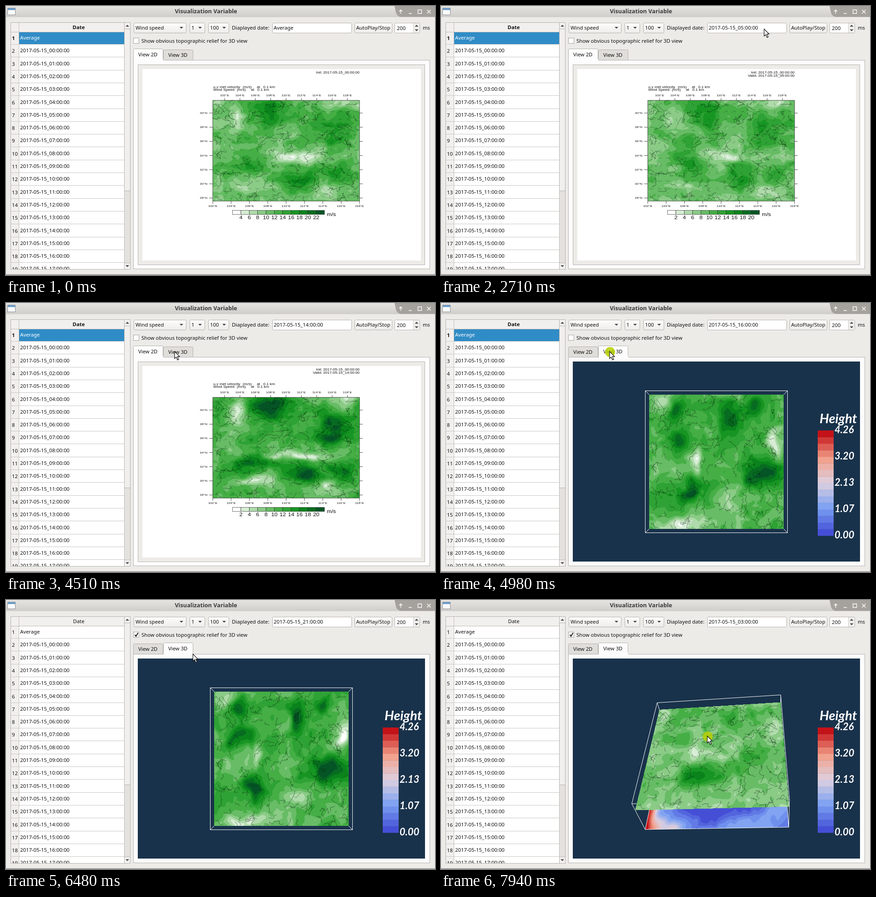
Animation, 944 px wide and 593 px high, one loop 8 s. Source, as an HTML page with a canvas:

```html
<!DOCTYPE html>
<html lang="en">
<head>
<meta charset="utf-8">
<title>Visualization Variable</title>
<style>
html, body { margin: 0; width: 100%; height: 100%; overflow: hidden; background: #edebe8; }
svg, canvas { position: absolute; left: 0; top: 0; width: 944px; height: 593px; }
text { font: 11.3px "Noto Sans", "Open Sans", sans-serif; fill: #111; white-space: pre; }
.bold { font-weight: bold; }
.title { font-size: 12.7px; font-weight: bold; fill: #3b3b3b; }
.fig { font-family: "Liberation Sans", sans-serif; }
.bar { font: italic bold 22px Lato, "Liberation Sans", sans-serif; fill: #fff; }
</style>
</head>
<body>
<svg id="ui" viewBox="0 0 944 593">
  <defs>
    <linearGradient id="titleBg" x2="0" y2="1"><stop stop-color="#e6e4e1"/><stop offset="1" stop-color="#cfcdc9"/></linearGradient>
    <linearGradient id="buttonBg" x2="0" y2="1"><stop stop-color="#fdfdfc"/><stop offset="1" stop-color="#eeecea"/></linearGradient>
    <clipPath id="tableClip"><rect x="11" y="37" width="250" height="543"/></clipPath>
    <clipPath id="sceneClip"><rect x="290" y="129" width="632" height="441"/></clipPath>
  </defs>
</svg>
<canvas id="map" width="944" height="593"></canvas>
<svg viewBox="0 0 944 593">
  <g id="cursor">
    <circle id="press" cx="1" cy="1" r="11" fill="#b5d000" fill-opacity=".85"/>
    <path d="M0 0V15.5L3.6 12.2L6.4 18.6L9 17.4L6.2 11.2H11Z" fill="#fff" stroke="#111" stroke-width="1.2"/>
  </g>
</svg>
<script>
const LOOP = 8000, TICK = 77, TAB_AT = 4840, SCENE_AT = 4980, CHECK_AT = 6320, DRAG_AT = 7400, DRAG_END = 7850;
const el = id => document.getElementById(id);
const lerp = (a, b, k) => a + (b - a) * k;
const clamp = (x, a, b) => Math.min(b, Math.max(a, x));
const range = n => [...Array(n).keys()];

/* Evenly spaced colour stops, resampled to n colours. */
function ramp(stops, n) {
  const rgb = stops.map(s => [1, 3, 5].map(i => parseInt(s.slice(i, i + 2), 16)));
  return range(n).map(i => {
    const x = i / (n - 1) * (stops.length - 1), j = Math.min(Math.floor(x), stops.length - 2);
    return rgb[j].map((c, k) => Math.round(lerp(c, rgb[j + 1][k], x - j)));
  });
}
const GREENS = ramp(['#ffffff', '#9bd296', '#45ae45', '#0b8f1a', '#055426'], 11);
const HEATS = ramp(['#454fd6', '#7aa0f2', '#ddd0e0', '#f2a08a', '#c41218'], 16);

/* ---------- window ---------- */
const EDGE = '#b4b1ad';
const box = (x, y, w, h, fill, stroke = EDGE, more = '') =>
  `<rect x="${x + .5}" y="${y + .5}" width="${w}" height="${h}" fill="${fill}" stroke="${stroke}" ${more}/>`;
const fill = (x, y, w, h, color, more = '') => `<rect x="${x}" y="${y}" width="${w}" height="${h}" fill="${color}" ${more}/>`;
const text = (x, y, s, more = '') => `<text x="${x}" y="${y}" ${more}>${s}</text>`;
const path = (d, color, width = 1, more = '') => `<path d="${d}" fill="none" stroke="${color}" stroke-width="${width}" ${more}/>`;
const arrow = (x, y, dir = 1, r = 4) => `<path d="M${x - r} ${y}h${2 * r}l${-r} ${dir * r}z" fill="#444"/>`;
const two = n => String(n).padStart(2, '0');
const stamp = h => h < 0 ? 'Average' : `2017-05-${15 + Math.floor(h / 24)}_${two(h % 24)}:00:00`;

function titleBar() {
  return fill(0, 0, 944, 25, 'url(#titleBg)') + fill(0, 24, 944, 1, '#dddbd8') +
    box(3, 4, 17, 15, '#fbfbfb', '#8a8f94') + fill(4, 5, 16, 4, '#6d9fce') +
    text(440, 16, 'Visualization Variable', 'class="title" text-anchor="middle"') +
    '<path d="M855 0H944V24H868Q860 22 858 14Z" fill="#a5a19d"/>' +
    path('M868.5 17V9M865 12l3.5-3.5 3.5 3.5M886 16.5h7M906.5 8.5h8v8h-8zM926.5 8.5l8 8m0-8l-8 8', '#fff', 1.4) +
    fill(0, 591, 944, 1, '#c5c2be') + fill(0, 592, 944, 1, '#8f8c88');
}

function table() {
  const pitch = 28.3;
  let s = box(10, 36, 263, 544, '#fff') + fill(11, 37, 249, 20, '#f2f0ee') + fill(11, 57, 17, 523, '#f2f0ee') +
    fill(28, 57, 232, 27, '#308cc6', 'id="selection"');
  s += text(160, 51, 'Date', 'id="head" text-anchor="middle"') + '<g clip-path="url(#tableClip)">';
  for (const i of range(19)) {
    const y = 57 + i * pitch, line = Math.round(y + 27) + .5;
    s += path(`M11 ${line}H260`, '#c9c6c3') + text(13, y + 18, i + 1, i ? '' : 'id="rowNo"') +
      text(31, y + 17, stamp(i - 1), i ? '' : 'id="rowText"');
  }
  s += '</g>' + path('M11 57.5H260M28.5 37V580M260.5 37V580', '#bdbab6');
  return s + fill(261, 37, 12, 543, '#e4e2df') + box(260, 36, 13, 14, '#f4f2f0') + box(260, 50, 13, 357, '#f1efed') +
    box(260, 566, 13, 14, '#f4f2f0') + arrow(267, 45.5, -1) + arrow(267, 571.5);
}

function toolbar() {
  const button = (x, w) => box(x, 37, w, 22, 'url(#buttonBg)', EDGE, 'rx="2"');
  const combo = (x, w, label) => button(x, w) + text(x + 4, 52, label) + arrow(x + w - 10, 46);
  return combo(281, 115, 'Wind speed') + combo(404, 33, '1') + combo(445, 45, '100') +
    text(497, 52, 'Diaplayed date:') + box(586, 37, 174, 22, '#fff', EDGE, 'rx="2"') + text(589, 52, '', 'id="date"') +
    button(767, 82) + text(808, 52, 'AutoPlay/Stop', 'text-anchor="middle"') +
    box(855, 37, 55, 22, '#fff', EDGE, 'rx="2"') + fill(897, 38, 13, 21, '#f1efed') + path('M896.5 38V59', '#cfccc9') +
    arrow(903.5, 45.5, -1) + arrow(903.5, 51.5) + text(860, 53, '200') + text(917, 52, 'ms') +
    box(280, 70, 12, 12, '#fff', '#a5a29e') + path('M283.5 76.5l2.5 3.5 4.5-7.5', '#111', 2, 'id="check"') +
    text(298, 81, 'Show obvious topographic relief for 3D view');
}

function tab(x, label, active) {
  const y = active ? 94 : 96;
  return box(x, y, 65, 119 - y, active ? '#fdfdfd' : '#e0deda', EDGE, 'rx="2"') +
    (active ? fill(x + 1, 117, 65, 5, '#fdfdfd') : fill(x + 1, 118, 64, 1, '#e0deda') + fill(x, 119, 66, 1, EDGE)) +
    text(x + 11, active ? 111 : 112, label);
}

/* The figure is shown wider than it was plotted, lettering included. */
const fig = (x, y, s, size, anchor = 'start', more = '') =>
  `<text class="fig" transform="translate(${x} ${y}) scale(1.25 1)" style="font-size:${size}px" text-anchor="${anchor}" ${more}>${s}</text>`;

function figure() {
  let s = box(290, 129, 631, 441, '#edebe8') + fill(300, 139, 613, 422, '#fff');
  s += fig(778, 149, 'Init: 2017-05-15_00:00:00', 6.7, 'end') + fig(778, 156, '', 6.7, 'end', 'id="valid"');
  const caption = (name, x, y) => fig(456, y, name, 6.9) + fig(x, y, '(m/s)', 6.9) + fig(x + 31, y, 'at', 6.9) + fig(x + 45, y, '0.1 km', 6.9);
  s += caption('u,v met velocity', 521, 181) + caption('Wind Speed', 508, 187);
  let ticks = '';
  for (const i of range(9)) {
    const top = 481 + i * 33.8, low = 455 + i * 40.35, name = `${102 + 2 * i}°E`;
    s += fig(top, 199, name, 5.9, 'middle') + fig(low, 443, name, 5.9, 'middle');
    ticks += `M${top} 203V208M${low} 430V436`;
  }
  for (const i of range(7)) {
    const y = 236 + i * 31.2;
    s += fig(443, y + 2, `${40 - 2 * i}°N`, 5.9, 'end');
    ticks += `M447 ${y}H455M778 ${y}H785`;
  }
  s += path(ticks, '#222', .8);
  GREENS.forEach((c, i) => s += fill(498.5 + i * 18.4, 450.5, 18.4, 9, `rgb(${c})`, 'stroke="#333" stroke-width=".7"'));
  for (const i of range(10)) s += fig(517 + i * 18.4, 470, '', 10, 'middle', `data-level="${2 + 2 * i}"`);
  return s + fig(706, 463, 'm/s', 10);
}

function scene() {
  let s = fill(290, 129, 632, 441, '#19324b') + '<g clip-path="url(#sceneClip)">';
  HEATS.forEach((c, i) => s += fill(829, 498.5 - i * 14.5, 35, 14.8, `rgb(${c})`));
  s += text(833, 265, 'Height', 'class="bar" style="font-size:29px"');
  for (const i of range(5)) s += text(866, 286.5 + i * 58, (4.26 * (1 - i / 4) + .001).toFixed(2), 'class="bar"');
  return s + '</g>';
}

el('ui').innerHTML += titleBar() + table() + toolbar() + box(280, 119, 652, 460, '#fdfdfd') +
  '<g id="tabs"></g><g id="figure">' + figure() + '</g><g id="scene">' + scene() + '</g>';

/* ---------- wind field ---------- */
const hash = (i, j) => { const s = Math.sin(i * 127.1 + j * 311.7) * 43758.5453; return s - Math.floor(s); };
function noise(x, y) {
  const i = Math.floor(x), j = Math.floor(y), ease = f => f * f * (3 - 2 * f), fx = ease(x - i), fy = ease(y - j);
  return lerp(lerp(hash(i, j), hash(i + 1, j), fx), lerp(hash(i, j + 1), hash(i + 1, j + 1), fx), fy) - .5;
}

/* Main wind centres: x, y and radii in percent, strength. Steady ones grow through the day, early ones fade. */
const LOW_WIND = {
  steady: [[40, 10, 12, 15, 4], [82, 27, 13, 13, 3.3], [80, 40, 13, 5, 3], [64, 76, 11, 11, 4], [88, 75, 8, 11, 3.8], [27, 64, 13, 8, 3.2],
    [18, 17, 6, 12, -3.5], [55, 58, 20, 4, -3.5], [88, 3, 10, 5, -2.5], [28, 84, 14, 5, -3], [79, 89, 8, 7, -3]],
  early: [[25, 45, 10, 14, 5], [28, 61, 6, 12, 3.5], [41, 25, 9, 14, 3.5], [93, 23, 14, 6, 4.5], [61, 78, 7, 13, 3.5]],
};
const HIGH_WIND = {
  steady: [[21, 14, 6, 9, 3.3], [62, 20, 7, 14, 3.6], [80, 9, 9, 8, 3], [21, 35, 12, 7, 3.5], [83, 57, 16, 9, 5], [31, 72, 9, 10, 4],
    [10, 6, 8, 7, -3], [94, 34, 5, 10, -4], [33, 50, 4, 11, -3], [60, 79, 10, 7, -2.5], [25, 97, 22, 5, -3]],
  early: [[48, 72, 16, 8, 7]],
};
const blobs = (list, u, v) => list.reduce((sum, [x, y, rx, ry, amp]) =>
  sum + amp * Math.exp(-(((100 * u - x) / rx) ** 2) - ((100 * v - y) / ry) ** 2), 0);

const GW = 140, GH = 110, cache = new Map();
function windField(hour, wind) {
  const key = hour + (wind === LOW_WIND ? 'low' : 'high');
  if (cache.has(key)) return cache.get(key);
  const average = hour < 0, growth = average ? .7 : Math.min(1.2, .15 + .08 * hour), fade = average ? .2 : Math.exp(-hour / 5);
  const drift = hour * .22, grid = new Float32Array(GW * GH);
  for (let n = 0; n < GW * GH; n++) {
    const u = n % GW / (GW - 1), v = Math.floor(n / GW) / (GH - 1);
    const x = u + .06 * noise(u * 10 + drift, v * 9), y = v + .06 * noise(u * 10 + 40, v * 9 - drift);
    const rough = 2.2 * noise(x * 10 + drift, y * 9) + 1.7 * noise(x * 21 - drift, y * 19) + .7 * noise(x * 42, y * 38);
    grid[n] = 3.4 + 1.6 * growth + growth * blobs(wind.steady, x, y) + fade * blobs(wind.early, x, y) + rough;
  }
  cache.set(key, grid);
  return grid;
}
function sample(grid, u, v) {
  const x = u * (GW - 1.001), y = v * (GH - 1.001), i = Math.floor(x), j = Math.floor(y), n = j * GW + i;
  return lerp(lerp(grid[n], grid[n + 1], x - i), lerp(grid[n + GW], grid[n + GW + 1], x - i), y - j);
}
const terrain = (u, v) => 14 * Math.exp(-u * 9 * (1 + noise(u * 14, v * 9))) + 2.3 + 5 * noise(u * 5 + v * 4, v * 6) + 1.5 * noise(u * 30, v * 15);

/* ---------- drawing ---------- */
const ctx = el('map').getContext('2d');
const layer = Object.assign(document.createElement('canvas'), { width: 944, height: 593 }).getContext('2d');
const pack = ([r, g, b]) => (255 << 24 | b << 16 | g << 8 | r) >>> 0;
const greenInk = GREENS.map(pack), heatInk = HEATS.map(pack);

/* Perspective map of the unit square onto a quad. */
function homography([[x0, y0], [x1, y1], [x2, y2], [x3, y3]]) {
  const p = x1 - x2, q = x3 - x2, r = y1 - y2, t = y3 - y2, sx = x0 - x1 + x2 - x3, sy = y0 - y1 + y2 - y3, det = p * t - q * r;
  const g = (sx * t - q * sy) / det, h = (p * sy - sx * r) / det;
  return [x1 - x0 + g * x1, x3 - x0 + h * x3, x0, y1 - y0 + g * y1, y3 - y0 + h * y3, y0, g, h];
}
function paint(quad, ink, value) {
  const img = ctx.createImageData(944, 593), pixels = new Uint32Array(img.data.buffer);
  const [a, b, c, d, e, f, g, h] = homography(quad), xs = quad.map(p => p[0]), ys = quad.map(p => p[1]);
  for (let y = Math.floor(Math.min(...ys)); y < Math.max(...ys); y++)
    for (let x = Math.floor(Math.min(...xs)); x < Math.max(...xs); x++) {
      const X = x + .5, Y = y + .5, w = (d * h - e * g) * X + (b * g - a * h) * Y + a * e - b * d;
      const u = ((e - f * h) * X + (c * h - b) * Y + b * f - c * e) / w;
      const v = ((f * g - d) * X + (a - c * g) * Y + c * d - a * f) / w;
      if (u >= 0 && u <= 1 && v >= 0 && v <= 1)
        pixels[y * 944 + x] = ink[clamp(Math.floor(value(u, v)), 0, ink.length - 1)];
    }
  layer.putImageData(img, 0, 0);
  ctx.drawImage(layer.canvas, 0, 0);
}
function stroke(lines, color, width) {
  ctx.beginPath();
  for (const line of lines) line.forEach(([x, y], i) => i ? ctx.lineTo(x, y) : ctx.moveTo(x, y));
  ctx.strokeStyle = color;
  ctx.lineWidth = width;
  ctx.stroke();
}

let seed = 7;
const random = () => (seed = (seed * 16807) % 2147483647) / 2147483647;
const borders = range(190).map(() => {
  let u = random(), v = random(), heading = random() * 6.3;
  return range(5 + Math.floor(random() * 8)).map(() => {
    const dir = heading + (random() - .5) * 2.6;
    heading += (random() - .5) * .9;
    return [u += .011 * Math.cos(dir), v += .013 * Math.sin(dir)];
  }).filter(([x, y]) => x > 0 && x < 1 && y > 0 && y < 1);
});

function drawWind(quad, hour, wind) {
  const grid = windField(hour, wind), [a, b, c, d, e, f, g, h] = homography(quad);
  paint(quad, greenInk, (u, v) => sample(grid, u, v));
  const project = ([u, v]) => [(a * u + b * v + c) / (g * u + h * v + 1), (d * u + e * v + f) / (g * u + h * v + 1)];
  stroke(borders.map(line => line.map(project)), 'rgba(0,30,8,.7)', .7);
}

function drawMap(hour) {
  const frame = [[455, 208], [778, 208], [778, 430], [455, 430]], barbs = [];
  drawWind(frame, hour, LOW_WIND);
  for (const n of range(18 * 13)) {
    const x = 464 + n % 18 * 18, y = 216 + Math.floor(n / 18) * 17;
    const dir = 8 * noise(x / 70 + hour * .2, y / 70), c = Math.cos(dir), s = Math.sin(dir);
    barbs.push([[x - 4 * c, y - 3 * s], [x + 4 * c, y + 3 * s], [x + 4 * c - 2 * s, y + 3 * s + 2 * c]]);
  }
  stroke(barbs, 'rgba(0,30,8,.5)', .6);
  stroke([[...frame, frame[0]]], '#222', .8);
}

const rotate = (a, b, angle) => [a * Math.cos(angle) - b * Math.sin(angle), a * Math.sin(angle) + b * Math.cos(angle)];
/* Corners of the square slice of the box at height z, seen by the turning camera. */
function slice(z0, turn) {
  return [[-1, -1], [1, -1], [1, 1], [-1, 1]].map(([x, y]) => {
    let z = z0;
    [x, y] = rotate(x, y, .06 * turn);
    [x, z] = rotate(x, z, .13 * turn);
    [y, z] = rotate(y, z, .727 * turn);
    const zoom = 823 / (5.58 - z);
    return [606 + x * zoom, 350 + y * zoom];
  });
}
function drawScene(hour, turn) {
  const lid = slice(.32, turn), floor = slice(-.32, turn);
  paint(floor, heatInk, terrain);
  stroke([[...lid, lid[0]], [...floor, floor[0]], ...lid.map((p, i) => [p, floor[i]])], '#fff', 1);
  drawWind(slice(lerp(.03, .17, turn), turn), hour, HIGH_WIND);
}

/* ---------- timeline ---------- */
const plays = [{ at: 1770, from: 0, every: 188 }, { at: SCENE_AT, from: 16, every: 265 }, { at: 7340, from: -1, every: 150 }];
function hourAt(t) {
  const play = plays.findLast(p => p.at <= t);
  return play ? play.from + Math.floor((t - play.at) / play.every) : -1;
}
/* Each trip: start, end, destination. */
const trips = [[70, 455, 791, 46], [2540, 3420, 337, 73], [4180, 4430, 371, 107], [5290, 5540, 370, 82],
  [CHECK_AT, 7230, 624, 310], [DRAG_AT, DRAG_END, 586, 300]];
const cursorAt = t => trips.reduce(([x, y], [a, b, toX, toY]) => {
  const k = clamp((t - a) / (b - a), 0, 1);
  return [lerp(x, toX, k), lerp(y, toY, k)];
}, [866, 400]);
const presses = [[1070, 1240], [4680, 5150], [6000, CHECK_AT], [7310, LOOP]];

const show = (id, on) => el(id).style.display = on ? '' : 'none';
let drawn = '';
function render(t) {
  const held = Math.floor((t + 8) / TICK) * TICK, hour = hourAt(t), in3d = t >= SCENE_AT, checked = t >= CHECK_AT, tab3d = t >= TAB_AT;
  const [x, y] = cursorAt(held), turn = clamp((held - DRAG_AT) / (DRAG_END - DRAG_AT), 0, 1);
  el('cursor').setAttribute('transform', `translate(${x} ${y})`);
  show('cursor', t >= 70);
  show('press', presses.some(([a, b]) => t >= a && t < b));

  const state = [hour, in3d, checked, tab3d, turn].join();
  if (state === drawn) return;
  drawn = state;
  el('date').textContent = stamp(hour);
  el('valid').textContent = hour < 0 ? '' : 'Valid: ' + stamp(hour);
  document.querySelectorAll('[data-level]').forEach(n => n.textContent = +n.dataset.level + (hour < 0 ? 2 : 0));
  show('check', checked);
  show('selection', !checked);
  el('rowText').style.fill = checked ? '' : '#fff';
  el('head').classList.toggle('bold', !checked);
  el('rowNo').classList.toggle('bold', !checked);
  el('tabs').innerHTML = tab(280, 'View 2D', !tab3d) + tab(346, 'View 3D', tab3d);
  show('figure', !in3d);
  show('scene', in3d);
  ctx.clearRect(0, 0, 944, 593);
  if (in3d) drawScene(hour, turn); else drawMap(hour);
}

const start = performance.now();
(function frame() {
  render((performance.now() - start) % LOOP);
  requestAnimationFrame(frame);
})();
</script>
</body>
</html>
```
